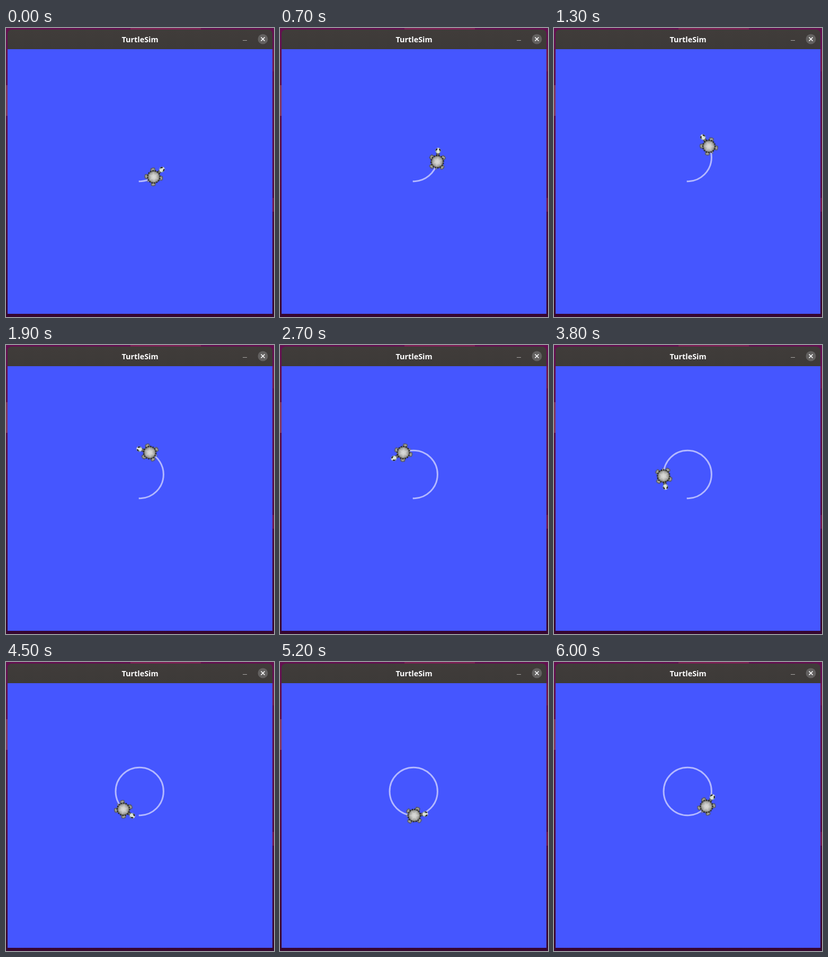
Write an HTML page that moves like this. It is 506 px wide and 546 px high and loops after 6100 ms.

```html
<!DOCTYPE html>
<html lang="en">
<head>
<meta charset="utf-8">
<title>TurtleSim</title>
<style>
  html, body { margin: 0; width: 100%; height: 100%; overflow: hidden; background: #4a0a40; }
  svg { display: block; width: 506px; height: 546px; }
  .title { font: 700 14.4px "Open Sans", "Noto Sans", sans-serif; fill: #fff; text-anchor: middle; }
  .trail {
    fill: none; stroke: #b3b8ff; stroke-width: 3; stroke-linecap: square;
    animation: draw 6.1s steps(61) infinite;
  }
  .turtle {
    transform-origin: 252.2px 244.5px;
    animation: orbit 6.1s steps(61) infinite;
  }
  /* Both run from 36 to 418 degrees, counted from the bottom of the circle. */
  @keyframes draw {
    from { stroke-dasharray: 36 720; }
    to { stroke-dasharray: 417.9 720; }
  }
  @keyframes orbit {
    from { transform: rotate(-36deg); }
    to { transform: rotate(-417.9deg); }
  }
</style>
</head>
<body>
<svg viewBox="0 0 506 546">
  <defs>
    <linearGradient id="wall" x2="0" y2="1">
      <stop offset="0" stop-color="#641050"/>
      <stop offset=".5" stop-color="#560c49"/>
      <stop offset="1" stop-color="#360630"/>
    </linearGradient>
    <linearGradient id="bar" x2="0" y2="1">
      <stop offset="0" stop-color="#403c3a"/>
      <stop offset="1" stop-color="#3d3a38"/>
    </linearGradient>
    <radialGradient id="shell">
      <stop offset="0" stop-color="#e0e0de"/>
      <stop offset=".55" stop-color="#bcbcb9"/>
      <stop offset="1" stop-color="#888885"/>
    </radialGradient>
    <g id="leg">
      <path d="M9-2.5 12.5-4.4 16-3.8 17.2 0 16.4 3.4 13 4 9 2.5Z" fill="#85857f" stroke="#454541" stroke-width=".9"/>
      <path d="M12.5-2 15.5 1.2" stroke="#aaaaa4" stroke-width="2"/>
    </g>
  </defs>

  <rect width="506" height="546" fill="url(#wall)"/>
  <rect x="235" width="133" height="3" fill="#7d2055"/>
  <rect y="108" width="3" height="58" fill="#823460"/>
  <rect x="503" y="40" width="3" height="42" fill="#701650"/>
  <rect x="503" y="321" width="3" height="26" fill="#701650"/>

  <path d="M3 40V11a8 8 0 0 1 8-8H495a8 8 0 0 1 8 8V40Z" fill="url(#bar)"/>
  <rect x="3" y="40" width="500" height="500" fill="#4556ff"/>
  <text class="title" x="253" y="27">TurtleSim</text>
  <rect x="447" y="23" width="8" height="1" fill="#aaa7a5"/>
  <circle cx="485" cy="21" r="9.5" fill="#636160"/>
  <path d="M481.5 17.5l7 7m0-7l-7 7" stroke="#fff" stroke-width="1.6"/>

  <path class="trail" pathLength="360" d="M252.2 289.7a45.2 45.2 0 0 0 0-90.4a45.2 45.2 0 0 0 0 90.4"/>

  <g class="turtle">
    <g transform="translate(252.2 290)">
      <use href="#leg" transform="rotate(47)"/>
      <use href="#leg" transform="rotate(-60)"/>
      <use href="#leg" transform="rotate(-140)"/>
      <use href="#leg" transform="rotate(130)"/>
      <path d="M-10-2-16 .5-10 2.2Z" fill="#b4b4b2" stroke="#5a5a58" stroke-width=".6"/>
      <g transform="rotate(-6)">
        <path d="M10 0H17" stroke="#373735" stroke-width="6"/>
        <path d="M11 0H17" stroke="#92928e" stroke-width="4" stroke-dasharray="1.6 1"/>
        <ellipse cx="21" rx="5.3" ry="5" fill="#dde3dc"/>
        <path d="M20.5-4.6 24-3.6 24.6-1.8 22-2.4ZM20.5 4.6 24 3.6 24.6 1.8 22 2.4Z" fill="#111" stroke="#111" stroke-width=".8"/>
        <path d="M18.2-3.5h2M18.2 3.5h2" stroke="#4f9468" stroke-width="1.2"/>
      </g>
      <circle r="11" fill="url(#shell)" stroke="#6a6a67" stroke-width="2.2"/>
      <circle r="11.8" fill="none" stroke="#1b1b19" stroke-width="2" pathLength="48" stroke-dasharray="1.7 1.3"/>
      <path d="M4 0 2-3.5H-2L-4 0-2 3.5H2ZM4 0H9.5M2-3.5 5-8.5M-2-3.5-5-8.5M-4 0H-9.5M-2 3.5-5 8.5M2 3.5 5 8.5"
            fill="none" stroke="#e5e5e2" stroke-width=".8" opacity=".65"/>
    </g>
  </g>
</svg>
</body>
</html>
```
